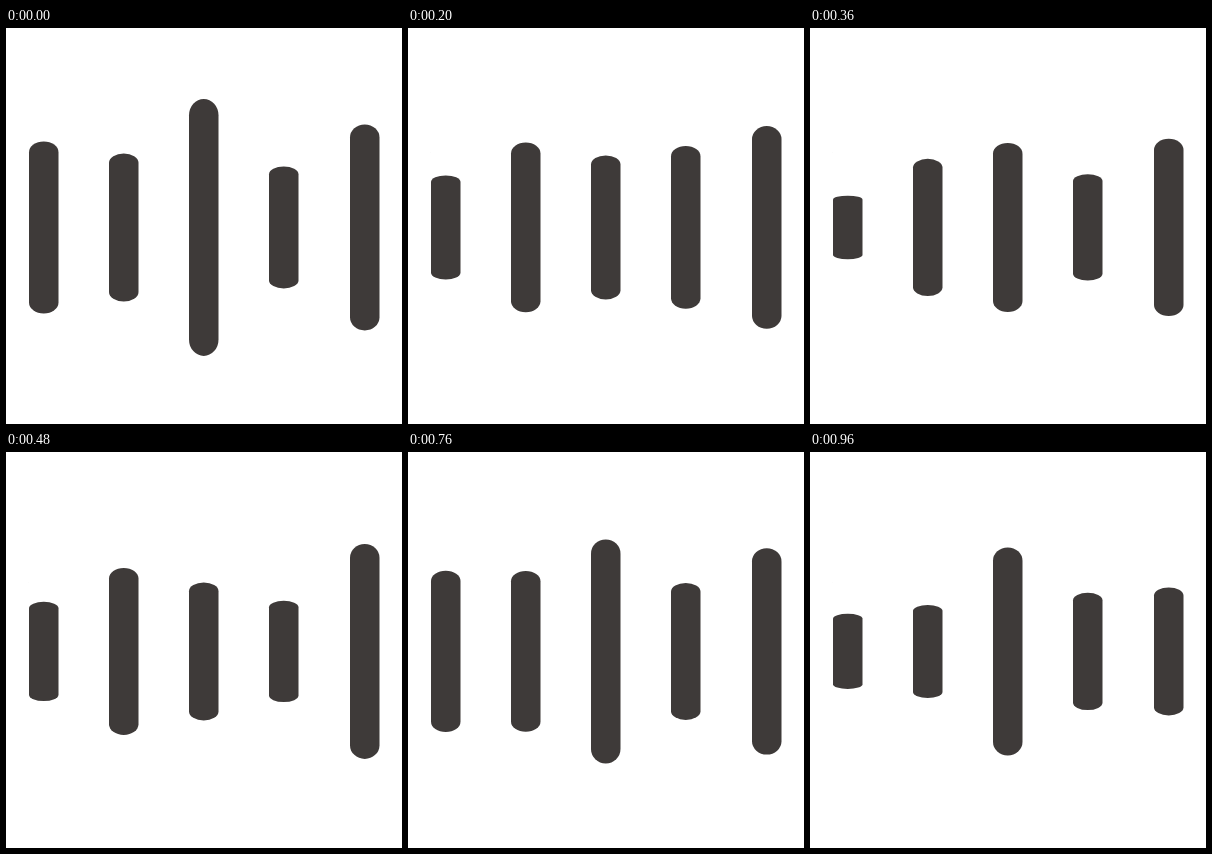
Animation of 396x396 px, one loop 1000 ms. Source, as an HTML page:

```html
<!DOCTYPE html>
<html lang="en">
<head>
<meta charset="utf-8">
<title>Sound bars</title>
<style>
  html, body { margin: 0; height: 100%; overflow: hidden; background: #fff; }
  svg { display: block; width: 100vw; height: 100vh; fill: #3e3a39; }
</style>
</head>
<body>
<svg viewBox="0 0 396 396"></svg>
<script>
const LOOP = 1000, STEP = 40;
const LEFT = 23, GAP = 80.25, WIDTH = 29.5, MIDDLE = 199.4, CAP = 0.064;

// Each bar swings from level to level, one level per beat (ms)
const swings = [
  { beat: 345, levels: [172, 63, 172, 63] },
  { beat: 160, levels: [148, 176, 132, 167, 113, 169, 93] },
  { beat: 120, levels: [257, 180, 132, 169, 138, 207, 213, 257, 208] },
  { beat: 210, levels: [122, 163, 93, 137, 137, 105] },
  { beat: 160, levels: [206, 208, 171, 215, 173, 212, 128] },
];

const svg = document.querySelector("svg");

function set(el, attrs) {
  for (const name in attrs) el.setAttribute(name, attrs[name]);
}

const bars = swings.map((swing, i) => {
  const bar = document.createElementNS(svg.namespaceURI, "rect");
  set(bar, { x: Math.floor(LEFT + i * GAP), width: WIDTH, rx: WIDTH / 2 });
  svg.append(bar);
  return bar;
});

function heightAt({ beat, levels }, t) {
  const k = Math.min(Math.floor(t / beat), levels.length - 2);
  const ease = (1 - Math.cos(Math.PI * (t / beat - k))) / 2;
  return levels[k] + (levels[k + 1] - levels[k]) * ease;
}

function draw(now) {
  const t = Math.floor((now % LOOP) / STEP) * STEP;
  bars.forEach((bar, i) => {
    const height = heightAt(swings[i], t);
    set(bar, { y: MIDDLE - height / 2, height, ry: height * CAP });
  });
  requestAnimationFrame(draw);
}
draw(performance.now());
</script>
</body>
</html>
```
